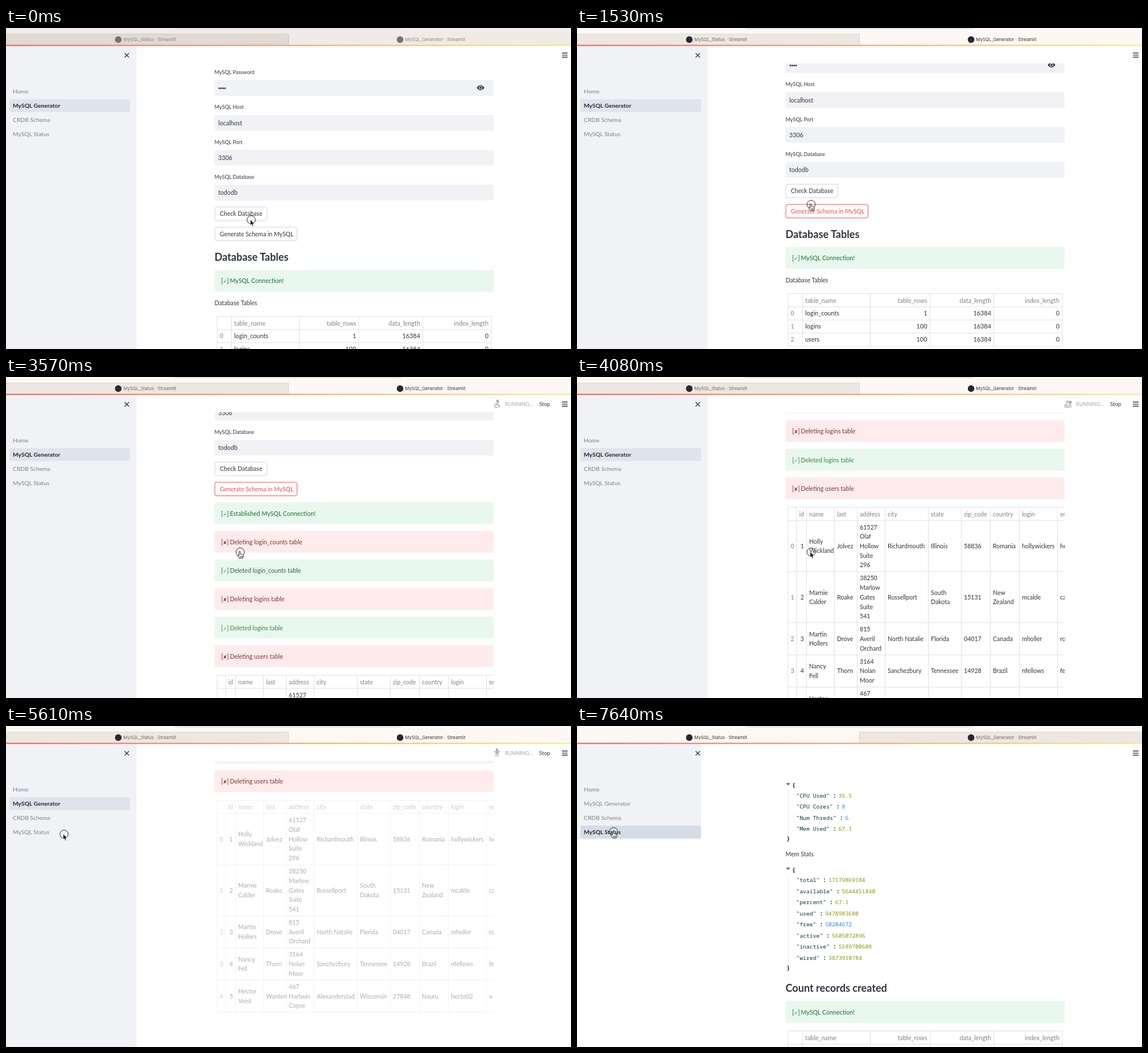
These frames come from a looping animation (993x564 px, 8 s). An HTML page:

```html
<!DOCTYPE html>
<html lang="en">
<head>
<meta charset="utf-8">
<title>MySQL Generator</title>
<style>
html, body { margin: 0; width: 100%; height: 100%; overflow: hidden; background: #fff; }
svg { display: block; width: 993px; height: 564px; font-family: Lato, "Open Sans", "DejaVu Sans", sans-serif; }
.tab { font-family: Inter, "Liberation Sans", sans-serif; }
.mono { font-family: "Noto Sans Mono", "DejaVu Sans Mono", monospace; }
.mark { font-family: "DejaVu Sans", sans-serif; font-size: 8.4px; }
</style>
</head>
<body>
<svg id="stage" viewBox="0 0 993 564"></svg>
<script>
const INK = '#31333f', GREY = '#7f8189', LINE = '#dfe0e4', PANEL = '#f0f2f6', RED = '#ff4b4b';
const LOOP = 8000;

const text = (x, y, s, size = 10.6, fill = INK, more = '') =>
  `<text x="${x}" y="${y}" font-size="${size}" fill="${fill}" ${more}>${s}</text>`;
const rect = (x, y, w, h, fill, more = '') =>
  `<rect x="${x}" y="${y}" width="${w}" height="${h}" fill="${fill}" ${more}/>`;
const path = (d, stroke, width = 1, fill = 'none') =>
  `<path d="${d}" stroke="${stroke}" stroke-width="${width}" fill="${fill}"/>`;
const END = 'text-anchor="end"', MID = 'text-anchor="middle"';

// ---- browser tabs, sidebar, toolbar ----
function tabs({ focus = true, page, tabHover }) {
  const status = page === 'status';
  const bar = focus ? '#fdf8f3' : '#f0ebe6';
  const back = !focus ? '#e0dad4' : tabHover ? '#dfdad4' : '#ede7e1';
  const icon = focus ? '#262833' : '#75716f';
  const label = on => !focus ? '#8a8582' : on ? '#36332f' : '#6e6963';
  const x = status ? 496.5 : 0;
  return rect(0, 0, 993, 31, bar) +
    rect(x, 10.5, 497, 20, back) +
    path(`M${x} 10.5h496.5`, focus ? '#e0d9d2' : '#d0c9c3') +
    path('M496.5 10.5V30', focus ? '#dcd5ce' : '#c9c2bc') +
    path('M295.5 -1q0 2.5 4 2.5h394q4 0 4 -2.5', '#d9d3ce') +
    `<circle cx="197.3" cy="20.4" r="5.8" fill="${icon}"/><circle cx="692.6" cy="20.4" r="5.8" fill="${icon}"/>` +
    text(206.3, 23.4, 'MySQL_Status · Streamlit', 7.8, label(status), 'class="tab"') +
    text(701.3, 23.4, 'MySQL_Generator · Streamlit', 7.8, label(!status), 'class="tab"') +
    (tabHover ? path('M.8 18.3l4.4 4.4m0 -4.4l-4.4 4.4', '#6b6763') : '');
}

function sidebar(status) {
  const active = status ? 3 : 1;
  const items = ['Home', 'MySQL Generator', 'CRDB Schema', 'MySQL Status'];
  return rect(0, 31, status ? 218 : 229.5, status ? 168.5 : 533, PANEL) +
    rect(6, 125 + 25 * (active - 1), 212, 22.5, status ? '#d6dce7' : '#dfe4ec', 'rx="2.5"') +
    items.map((s, i) => text(12, 115 + 25 * i, s, 10.3,
      i === active ? '#262730' : GREY, i === active ? 'font-weight="700"' : '')).join('') +
    path('M208.5 44.2l7.6 7.6m0 -7.6l-7.6 7.6', INK, 1.3);
}

const icons = {
  wheel: '<circle cx="864" cy="42" r="1.6"/><path d="M863 45l-1 4h4.5l1.5 4M863 45.5l4-.5M861 47a3.4 3.4 0 1 0 4 5"/>',
  person: '<circle cx="863" cy="42" r="1.7"/><path d="M857.5 45.3h11M863 45v4M861.3 45.5v8.5M864.7 45.5v8.5"/>',
  swim: '<circle cx="867" cy="44.5" r="1.7"/><path d="M859.5 44l3-2 5 6M859 47.5l4-3M856.5 49.8q2-1.8 4 0t4.3 0 4.2 0M856.5 53q2-1.8 4 0t4.3 0 4.2 0"/>'
};

const toolbar = icon => path('M977 44h10M977 47.6h10M977 51.2h10', INK, 1.4) +
  (icon ? `<g fill="#a3a5ab" stroke="#a3a5ab" stroke-width="1.4" >${icons[icon].replace(/<path/g, '<path fill="none"')}</g>` +
    text(877, 51, 'RUNNING...', 9.1, '#a3a5ae') + text(937, 51, 'Stop', 9.6) : '');

// ---- page widgets ----
const field = (y, label, value) => text(366.5, y, label, 9.15) +
  rect(366.5, y + 10.5, 490.5, 27.5, PANEL, 'rx="3"') + text(373, y + 28.3, value, 10.7);

const button = (y, w, s, hot) =>
  rect(367, y, w, 23.7, '#fff', `rx="3" stroke="${hot ? RED : '#d3d4d8'}"`) +
  text(375.8, y + 15.7, s, 10.5, hot ? RED : INK);

const heading = (y, s) => text(366.5, y, s, 18.1, INK, 'font-weight="700"');

function alertBox(y, ok, s, fade = 1) {
  const mark = `[<tspan class="mark">${ok ? '✓' : '✘'}</tspan>]`;
  const ink = ok ? '#177233' : '#7d353b';
  return rect(366.5, y, 490.5, 38.3, ok ? '#e9f8ee' : '#ffebeb', 'rx="3"') +
    `<g opacity="${fade}">` + text(378, y + 23.4, mark, 10.7, ink) + text(393.4, y + 23.4, s, 10.7, ink) + '</g>';
}

function sizesTable(y) {
  const xs = [371, 396.5, 515.5, 620, 732.5, 853], ends = [615.5, 728, 848];
  const rows = [['login_counts', 1], ['logins', 100], ['users', 100]];
  let out = path(`M371 ${y}H853` + [0, 1, 2, 3].map(i => `M371 ${y + 23.5 + 23 * i}H853`).join('') +
    xs.map(x => `M${x} ${y}v92.5`).join(''), LINE);
  out += text(401, y + 16, 'table_name', 10.9, GREY);
  ['table_rows', 'data_length', 'index_length'].forEach((s, i) => out += text(ends[i], y + 16, s, 10.9, GREY, END));
  rows.forEach(([name, n], r) => {
    const b = y + 38.8 + 23 * r;
    out += text(378.5, b, r, 10.7, GREY, MID) + text(401, b, name, 10.9);
    [n, 16384, 0].forEach((v, i) => out += text(ends[i], b, v, 10.9, INK, END));
  });
  return out;
}

const people = [
  ['Holly/Wickland', 'Jolvez', '61527/Olaf/Hollow/Suite/296', 'Richardmouth', 'Illinois', '58836', 'Romania', 'hollywickers', 'he'],
  ['Marnie/Calder', 'Roake', '38250/Marlow/Gates/Suite/541', 'Russellport', 'South/Dakota', '15131', 'New/Zealand', 'mcalde', 'ca'],
  ['Martin/Hollers', 'Drove', '815/Averil/Orchard', 'North Natalie', 'Florida', '04017', 'Canada', 'mholler', 'ro'],
  ['Nancy/Fell', 'Thorn', '3164/Nolan/Moor', 'Sanchezbury', 'Tennessee', '14928', 'Brazil', 'nfellows', 'fe'],
  ['Hector/Voist', 'Warden', '467/Hartwin/Copse', 'Alexanderstad', 'Wisconsin', '27848', 'Nauru', 'hecto02', 'v']
];

function peopleTable(y, opacity) {
  const xs = [408, 457, 497, 546, 622, 680, 731, 782, 849];
  const heads = ['name', 'last', 'address', 'city', 'state', 'zip_code', 'country', 'login', 'email'];
  const edges = [0, 23, 113, 202.7, 259.2, 315.7, 372].map(d => y + d);
  const lines = edges.map(e => `M371 ${e}H857`).join('') +
    [371, 386, ...xs.map(x => x - 4.5)].map(x => `M${x} ${y}v372`).join('');
  let out = path(lines, LINE) + text(399, y + 15.7, 'id', 10.6, GREY, END);
  heads.forEach((s, i) => out += text(xs[i], y + 15.7, s, 10.6, GREY));
  people.forEach((row, r) => {
    const mid = (edges[r + 1] + edges[r + 2]) / 2 + 4;
    out += text(378.5, mid, r, 10.6, GREY, MID) + text(399, mid, r + 1, 10.6, INK, END);
    row.forEach((cell, i) => cell.split('/').forEach((s, k, all) =>
      out += text(xs[i], mid + 16.7 * (k - (all.length - 1) / 2), s)));
  });
  return `<g opacity="${opacity}">${out}</g>`;
}

// ---- pages ----
function generator({ scroll = 0, hot, icon, fade = 1 }) {
  let out = field(81, 'MySQL Password', '') +
    [0, 1, 2, 3].map(i => `<circle cx="${374.8 + 3.4 * i}" cy="106" r="1.45" fill="${INK}"/>`).join('') +
    path('M827.3 105Q834 96.2 840.7 105Q834 113.8 827.3 105Z', 'none', 0, INK) +
    `<circle cx="834" cy="105" r="2.5" fill="${INK}" stroke="${PANEL}" stroke-width="1.1"/>` +
    field(142.4, 'MySQL Host', 'localhost') + field(203.6, 'MySQL Port', '3306') +
    field(264.9, 'MySQL Database', 'tododb') +
    button(314.5, 91.5, 'Check Database', hot === 'check') +
    button(350, 144.5, 'Generate Schema in MySQL', hot === 'generate');
  if (icon) {
    out += alertBox(385.3, true, 'Established MySQL Connection!');
    ['login_counts', 'logins', 'users'].forEach((s, i) => {
      out += alertBox(435.5 + 100.4 * i, false, `Deleting ${s} table`);
      if (i < 2) out += alertBox(485.7 + 100.4 * i, true, `Deleted ${s} table`, i ? .85 : 1);
    });
    out += peopleTable(689, fade);
  } else {
    out += heading(408.6, 'Database Tables') + alertBox(425, true, 'MySQL Connection!') +
      text(366.5, 487.3, 'Database Tables') + sizesTable(506.5);
  }
  return `<g clip-path="url(#view)"><g transform="translate(0 ${-scroll})">${out}</g></g>`;
}

function json(y, entries) {
  const step = 19.5, end = y + step * entries.length;
  const mono = (x, b, s, fill, bold) => text(x, b, s, 9.8, fill, `class="mono" ${bold ? 'font-weight="700"' : ''}`);
  let out = path(`M367.5 ${y - 8}h7.4l-3.7 4.2z`, 'none', 0, '#586e75') +
    mono(378, y, '{', '#002b36', true) + mono(368.5, end + 16, '}', '#002b36', true) +
    path(`M371.5 ${y + 5}V${end + 4}`, '#ebebeb');
  entries.forEach(([key, value, small], i) => {
    const b = y + 17.4 + step * i, x = 385.3 + 5.88 * (key.length + 2);
    out += mono(385.3, b, `"${key}"`, '#073642') + mono(x + 5.8, b, ':', '#002b36', true) +
      mono(x + 15.6, b, value, small ? '#268bd2' : '#859900');
  });
  return out;
}

const statusPage = () =>
  json(108.3, [['CPU Used', '35.5'], ['CPU Cores', '8', 1], ['Num Threds', '6', 1], ['Mem Used', '67.1']]) +
  text(366.5, 229, 'Mem Stats') +
  json(256.8, [['total', '17179869184'], ['available', '5644451840'], ['percent', '67.1'], ['used', '9478983680'],
    ['free', '50204672', 1], ['active', '5605072896'], ['inactive', '5589700608'], ['wired', '3873910784']]) +
  heading(466.6, 'Count records created') + alertBox(483.2, true, 'MySQL Connection!') + sizesTable(535.7);

function cursor([x, y, hand]) {
  const shape = hand
    ? path('M-2 6.5V0q0-1.3 1.1-1.3T.2 0v3.6l1-.2q1 0 1.2.8 1.6-.5 2 .7 1.4-.2 1.4 1.2 0 3-1.3 5H-1.6q-1-2.6-2.9-4.4-.5-1.4.8-1.4z M0 7v2.6M2 7v2.6M3.6 7v2.6', '#111', .9, '#fff')
    : path('M-1.6 -.3V9.7L.6 7.7 2.3 11.4 4 10.6 2.4 7H5.6Z', '#fff', .8, '#000');
  return `<g transform="translate(${x} ${y})"><circle r="7.3" fill="none" stroke="#222" stroke-width=".95"/>${shape}</g>`;
}

// ---- timeline: each entry holds until the next ----
const run = { scroll: 558.3, fade: .4 };
const steps = [
  { at: 0, focus: false, at_: [431, 337] },
  { at: 510, focus: false, at_: [411.5, 323.5] },
  { at: 1020, hot: 'check', at_: [411.5, 323.5, true] },
  { at: 1530, scroll: 40, hot: 'generate', at_: [411.5, 310, true] },
  { at: 2040, scroll: 51, hot: 'generate', at_: [411.5, 307.5, true] },
  { at: 3570, scroll: 165, hot: 'generate', icon: 'wheel', at_: [411.5, 307.5, true] },
  { at: 4080, scroll: 460, icon: 'swim', at_: [411.5, 307.5] },
  { at: 4590, ...run, icon: 'person', at_: [411.5, 307.5] },
  { at: 5100, ...run, icon: 'wheel', at_: [411.5, 307.5] },
  { at: 5610, ...run, icon: 'person', at_: [102, 190] },
  { at: 6120, ...run, icon: 'wheel', tabHover: true, at_: [300, 11] },
  { at: 6630, ...run, icon: 'swim', tabHover: true, at_: [324, 15.3] },
  { at: 7130, page: 'status', at_: [97, 141, true] },
  { at: 7640, page: 'status', at_: [64.3, 185.7, true] }
];

const stage = document.getElementById('stage');
const defs = `<defs><clipPath id="view"><rect x="360" y="62" width="497.5" height="502"/></clipPath>
  <linearGradient id="glow"><stop stop-color="#f2524b"/><stop offset=".5" stop-color="#f99a5c"/><stop offset="1" stop-color="#fbe975"/></linearGradient></defs>`;

function draw(s) {
  const status = s.page === 'status';
  stage.innerHTML = defs + rect(0, 0, 993, 564, '#fff') +
    (status ? statusPage() : generator(s)) +
    sidebar(status) + toolbar(s.icon) + tabs(s) +
    rect(0, 29.6, 993, 1.9, 'url(#glow)') + cursor(s.at_);
}

let shown, start;
function tick(now) {
  start ??= now;
  const t = (now - start) % LOOP;
  const step = steps.findLast(s => s.at <= t);
  if (step !== shown) draw(shown = step);
  requestAnimationFrame(tick);
}
draw(shown = steps[0]);
requestAnimationFrame(tick);
</script>
</body>
</html>
```
